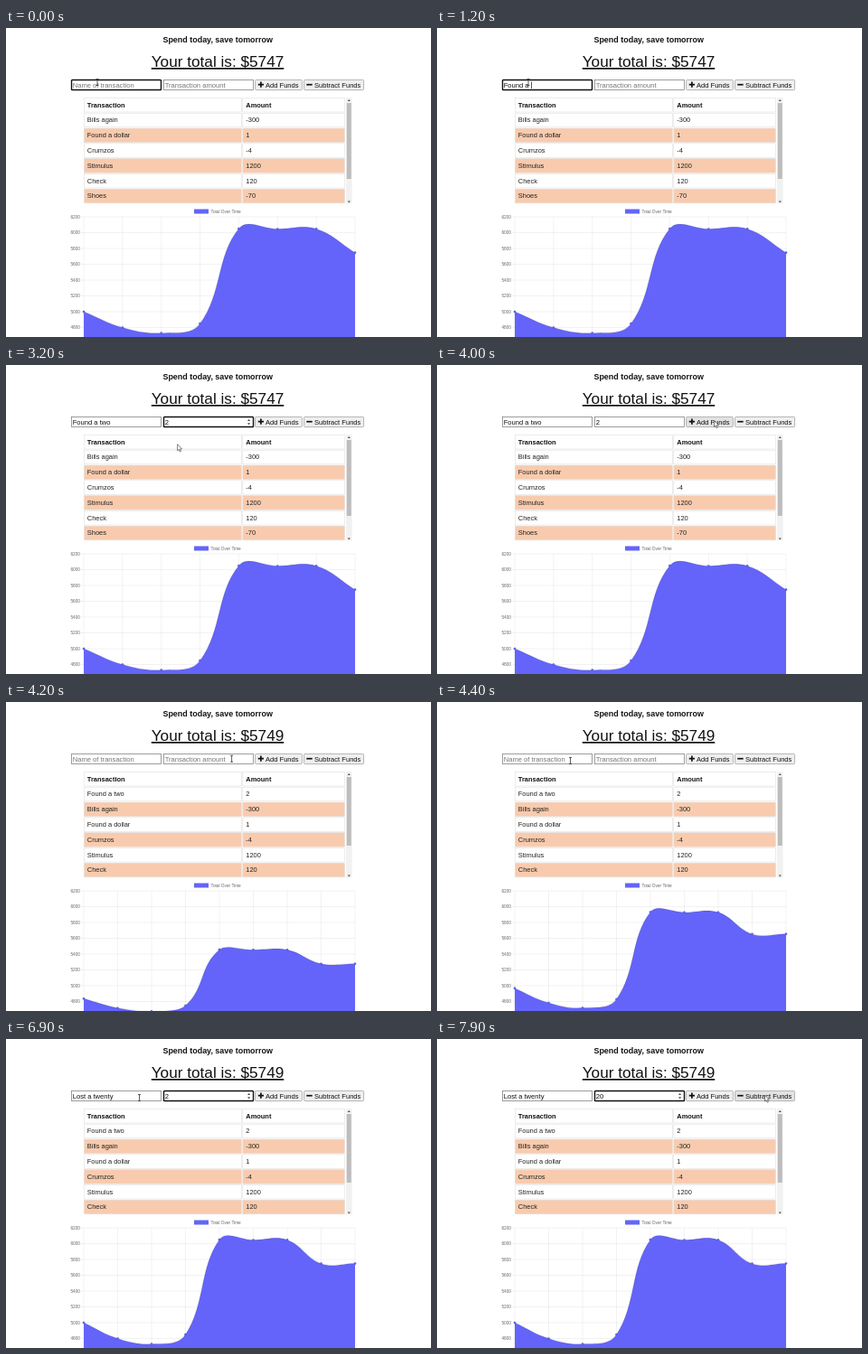
Write an HTML page that moves like this. It is 470x342 px and loops after 8 s.

```html
<!DOCTYPE html>
<html lang="en">
<head>
<meta charset="utf-8">
<title>Budget tracker</title>
<style>
html, body { margin: 0; width: 100%; height: 100%; overflow: hidden; background: #fff; }
svg { display: block; width: 470px; height: 342px; font-family: "Liberation Sans", Arial, sans-serif; }
text { white-space: pre; }
</style>
</head>
<body>
<svg id="stage" viewBox="0 0 470 342"></svg>
<script>
const LOOP = 8000, SUBMIT = 4050, GROW = 756;
const BLUE = '#6464fa', FONT = 7.6;
const stage = document.getElementById('stage');
const pen = document.createElement('canvas').getContext('2d');
pen.font = '100px "Liberation Sans", Arial, sans-serif';
const textWidth = s => pen.measureText(s).width * FONT / 100;

const entries = [['Found a two', 2], ['Bills again', -300], ['Found a dollar', 1], ['Crumzos', -4],
  ['Stimulus', 1200], ['Check', 120], ['Shoes', -70], ['Books', -200]];

// [time, value] steps
const nameSteps = [[0, ''], [600, 'F'], [700, 'Fo'], [800, 'Fou'], [900, 'Foun'], [1000, 'Found'],
  [1100, 'Found a'], [1200, 'Found a '], [1600, 'Found a t'], [1700, 'Found a tw'], [1800, 'Found a two'],
  [SUBMIT, ''], [5300, 'L'], [5400, 'Lo'], [5500, 'Los'], [5600, 'Lost'], [5700, 'Lost a'],
  [5900, 'Lost a '], [6000, 'Lost a t'], [6100, 'Lost a tw'], [6200, 'Lost a twe'],
  [6300, 'Lost a twen'], [6400, 'Lost a twent'], [6500, 'Lost a twenty']];
const amountSteps = [[0, ''], [2700, '2'], [SUBMIT, ''], [6900, '2'], [7100, '20']];
const focusSteps = [[0, 'name'], [2300, 'amount'], [3900, ''], [4800, 'name'], [6700, 'amount']];
const mousePath = [[0, 101, 60], [1600, 101, 60], [1900, 113, 80], [2900, 135, 100], [3700, 306.5, 61.5],
  [4100, 306.5, 61.5], [4350, 147.5, 65], [7400, 147.5, 65], [7850, 362.5, 62]];

const at = (steps, t) => steps.filter(s => s[0] <= t).pop()[1];

const rect = (x, y, w, h, fill, more = '') =>
  `<rect x="${x}" y="${y}" width="${w}" height="${h}" fill="${fill}" ${more}/>`;
const text = (x, y, size, s, more = '') =>
  `<text x="${x}" y="${y}" font-size="${size}" ${more}>${s}</text>`;
const path = (d, fill, more = '') => `<path d="${d}" fill="${fill}" ${more}/>`;

function field(x, value, hint, focused, isNumber) {
  let s = rect(x + .5, 57.5, 99, 11, '#fff',
    focused ? 'stroke="#111" stroke-width="1.4" rx=".8"' : 'stroke="#858585" stroke-width=".8"');
  s += text(x + 1.7, 65.6, FONT, value || hint, `fill="${value ? '#111' : '#757575'}"`);
  if (focused && isNumber)
    s += path(`M${x + 93} 62l1.6-2 1.6 2zM${x + 93} 64.2l1.6 2 1.6-2z`, '#444');
  if (focused && value && !isNumber)
    s += rect(x + 2 + textWidth(value), 59.5, .7, 7.5, '#111');
  return s;
}

function button(x, w, label, sign, hover) {
  return rect(x, 57.4, w, 11.2, hover ? '#e2e2e2' : '#efefef', 'stroke="#9a9a9a" stroke-width=".7" rx="1"') +
    path(sign, 'none', 'stroke="#111" stroke-width="1.7"') +
    text(x + 11.3, 65.5, FONT, label, 'fill="#111"');
}

function table(rows, thumb) {
  let s = '';
  [['Transaction', 'Amount'], ...rows].forEach(([name, amount], i) => {
    const y = 77.4 + i * 16.8;
    const fill = i && i % 2 === 0 ? '#f8cbae' : '#fff';
    const more = i ? 'fill="#222"' : 'font-weight="bold" fill="#111"';
    [[86.3, 174.2, name], [261.8, 112.8, amount]].forEach(([x, w, label]) => {
      s += rect(x, y, w, 15.6, fill, 'stroke="#e3e0de" stroke-width=".6"');
      s += text(x + 3.5, y + 10.2, 7.45, label, more);
    });
  });
  return s + rect(376, 77, 6.6, 117.5, '#f1f1f1') + rect(376.8, 83, 5, thumb, '#bdbdbd') +
    path('M377.7 81l1.6-2 1.6 2zM377.7 191.5l1.6 2 1.6-2z', '#555');
}

// Spline with tension 0.4, growing from the base line
function chart(totals, grow) {
  const base = 349, top = 209, left = 86, width = 300;
  const valueY = v => base - (v - 4600) * .0875;
  const pts = totals.map((v, i) => [left + i * width / (totals.length - 1), valueY(v)]);
  const out = ([x, y]) => `${x.toFixed(2)} ${(base + (Math.max(top, Math.min(base, y)) - base) * grow).toFixed(2)}`;
  const handles = pts.map((p, i) => {
    const a = pts[i - 1] || p, b = pts[i + 1] || p;
    const da = Math.hypot(p[0] - a[0], p[1] - a[1]), db = Math.hypot(b[0] - p[0], b[1] - p[1]);
    const shift = k => [0, 1].map(j => p[j] + .4 * k / (da + db) * (b[j] - a[j]));
    return [shift(-da), shift(db)];
  });
  let line = 'M' + out(pts[0]);
  for (let i = 1; i < pts.length; i++)
    line += `C${out(handles[i - 1][1])} ${out(handles[i][0])} ${out(pts[i])}`;

  let s = rect(208, 200.5, 16, 5, BLUE) + text(226.5, 204.5, 4.75, 'Total Over Time', 'fill="#666"');
  let grid = '';
  for (let v = 6200; v >= 4800; v -= 200) {
    grid += `M82.5 ${valueY(v)}H386`;
    s += text(82, valueY(v) + 1.7, 4.75, v, 'fill="#666" text-anchor="end"');
  }
  for (const [x] of pts) grid += `M${x} ${top}V${base}`;
  s += path(grid, 'none', 'stroke="#000" stroke-opacity=".1" stroke-width=".5"');
  s += path(`${line}L386 ${base}H${left}Z`, BLUE);
  s += path(line, 'none', 'stroke="#000" stroke-opacity=".1" stroke-width="1.2"');
  for (const p of pts) {
    const [x, y] = out(p).split(' ');
    s += `<circle cx="${x}" cy="${y}" r="1.3" fill="${BLUE}" stroke="#000" stroke-opacity=".12" stroke-width=".5"/>`;
  }
  return s;
}

function mouse(t) {
  let i = mousePath.findIndex(p => p[0] > t);
  if (i < 0) i = mousePath.length;
  const a = mousePath[i - 1], b = mousePath[i] || a;
  const u = b === a ? 0 : (t - a[0]) / (b[0] - a[0]);
  const k = u * u * (3 - 2 * u);
  return [a[1] + (b[1] - a[1]) * k, a[2] + (b[2] - a[2]) * k];
}

function pointer(t, [x, y]) {
  if (t >= 1900 && t < 2900) return '';
  const overField = y > 57 && y < 69 && x > 72 && x < 274;
  const shape = overField
    ? path('M-1.5-3.5H1.5M0-3.5V3.5M-1.5 3.5H1.5', 'none', 'stroke="#333" stroke-width=".8"')
    : path('M0 0V7L1.6 5.6 2.7 8.2 3.9 7.7 2.8 5.2H5Z', '#fff', 'stroke="#333" stroke-width=".6"');
  return `<g transform="translate(${x} ${y})">${shape}</g>`;
}

function draw(t) {
  const done = t >= SUBMIT;
  const rows = entries.slice(done ? 0 : 1);
  const totals = [5000];
  for (const [, amount] of [...rows].reverse()) totals.push(totals[totals.length - 1] + amount);
  const total = totals[totals.length - 1];
  const grow = done ? 1 - (1 - Math.min(1, (t - SUBMIT) / GROW)) ** 4 : 1;
  const focus = at(focusSteps, t), spot = mouse(t);
  const over = (x, w) => spot[1] > 57 && spot[1] < 69 && spot[0] > x && spot[0] < x + w;

  stage.innerHTML =
    text(234.2, 16.1, 8.95, 'Spend today, save tomorrow', 'font-weight="bold" text-anchor="middle" fill="#111"') +
    text(234, 43, 17.2, 'Your total is: $' + total, 'text-anchor="middle" text-decoration="underline" fill="#111"') +
    field(72, at(nameSteps, t), 'Name of transaction', focus === 'name') +
    field(174, at(amountSteps, t), 'Transaction amount', focus === 'amount', true) +
    button(275.6, 51.8, 'Add Funds', 'M278.8 62.7h6.2M281.9 59.6v6.2', over(275.6, 51.8)) +
    button(329.6, 66, 'Subtract Funds', 'M332.3 62.7h6.4', over(329.6, 66)) +
    table(rows.slice(0, 6), done ? 76 : 84) +
    chart(totals, grow) +
    pointer(t, spot);
}

function tick() {
  draw(performance.now() % LOOP);
  requestAnimationFrame(tick);
}
tick();
</script>
</body>
</html>
```
